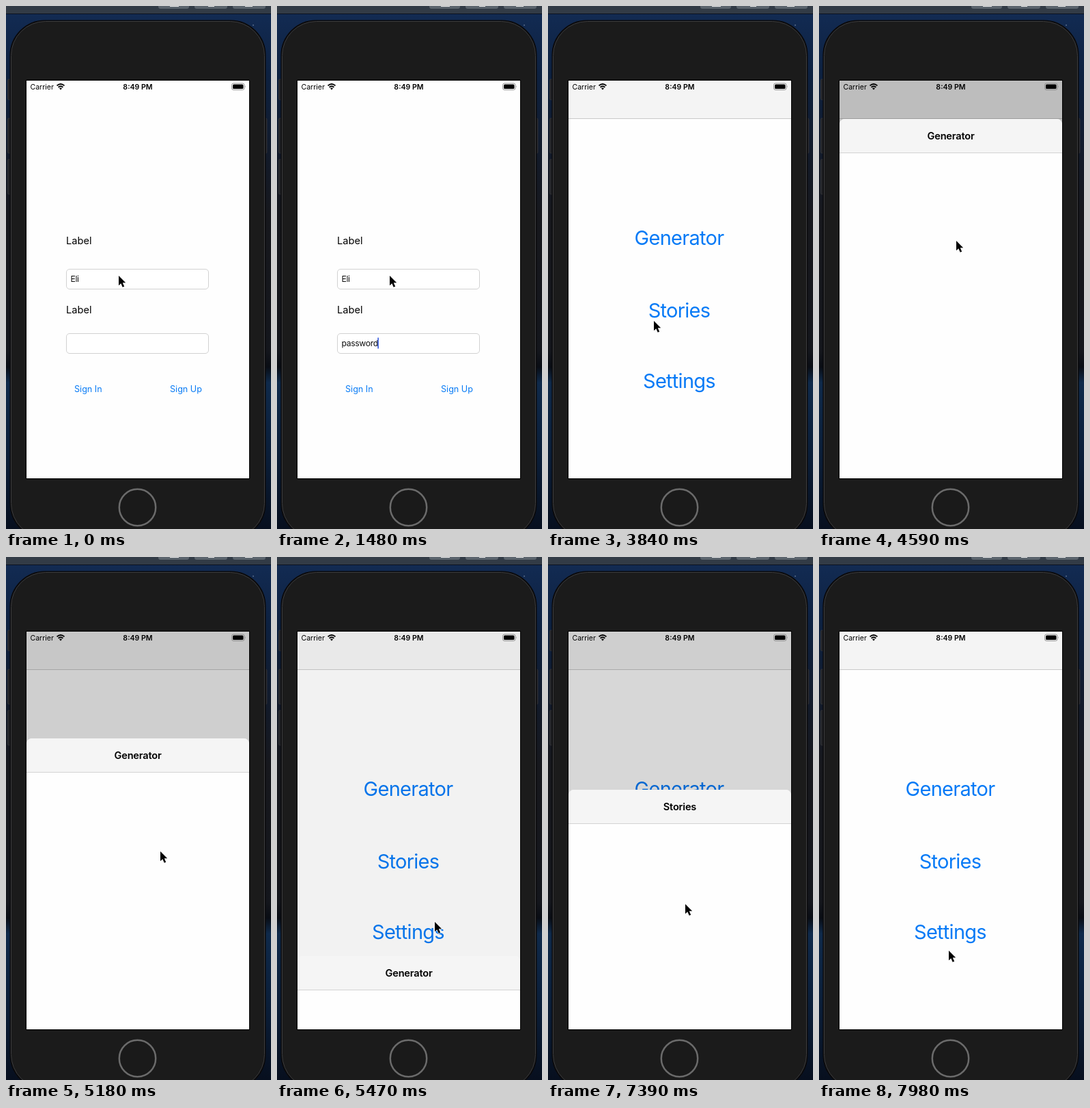
Recreate the animation shown at these times as an HTML page. Size 388x764 px, loop 8000 ms.

```html
<!DOCTYPE html>
<html lang="en">
<head>
<meta charset="utf-8">
<title>Sign in demo</title>
<style>
  html, body { margin: 0; width: 100%; height: 100%; overflow: hidden; background: #0b1a30; }
  svg { display: block; width: 388px; height: 764px; font-family: Inter, "Liberation Sans", sans-serif; }
  .label { font-size: 14.6px; }
  .field { fill: #fff; stroke: #d2d2d2; }
  .input { font-size: 12.2px; letter-spacing: -.03em; fill: #111; }
  .link { font-size: 12.6px; fill: #0a7cf5; }
  .item { font-size: 29px; letter-spacing: -.025em; fill: #067af6; text-anchor: middle; }
  .title { font-size: 14.6px; font-weight: 600; letter-spacing: -.2px; text-anchor: middle; }
</style>
</head>
<body>
<svg viewBox="0 0 388 764">
  <defs>
    <linearGradient id="desk" x2="0" y2="1">
      <stop offset="0" stop-color="#132c55"/>
      <stop offset=".13" stop-color="#0d2140"/>
      <stop offset=".3" stop-color="#131a28"/>
      <stop offset=".4" stop-color="#17181d"/>
      <stop offset=".66" stop-color="#14161c"/>
      <stop offset=".69" stop-color="#090d14"/>
      <stop offset=".72" stop-color="#0f2a4b"/>
      <stop offset=".88" stop-color="#0a1c35"/>
      <stop offset="1" stop-color="#070f1e"/>
    </linearGradient>
    <clipPath id="screen"><rect x="30" y="109" width="326" height="581"/></clipPath>
  </defs>

  <rect width="388" height="764" fill="url(#desk)"/>
  <rect width="388" height="11" fill="#323b46"/>
  <path d="M0 11.5H388" stroke="#0a1220"/>
  <g fill="#5b646d">
    <rect x="223" y="-6" width="45" height="10" rx="3"/>
    <rect x="276" y="-6" width="48" height="10" rx="3"/>
    <rect x="332" y="-6" width="48" height="10" rx="3"/>
  </g>
  <path d="M240 0H253M296 0H305M350 0H361" stroke="#eee" stroke-width="2"/>
  <circle cx="362" cy="28" r=".8" fill="#8a9bb5"/>

  <g fill="#25262a" stroke="#3a3b3f" stroke-width=".6">
    <rect x="2.500" y="107" width="6" height="30" rx="1.500"/>
    <rect x="2.500" y="164" width="6" height="51" rx="1.500"/>
    <rect x="2.500" y="224" width="6" height="51" rx="1.500"/>
    <rect x="377" y="164" width="5" height="51" rx="1.500"/>
  </g>
  <rect x="7" y="22" width="372" height="755" rx="50" fill="#1b1b1b" stroke="#0a0a0c" stroke-width="3"/>
  <rect x="7.500" y="22.500" width="371" height="754" rx="50" fill="#1b1b1b" stroke="#3d3d3f"/>
  <circle cx="192.500" cy="732.500" r="26.700" fill="#1a1a1a" stroke="#6b6b6b" stroke-width="2.500"/>
  <rect x="29" y="108" width="328" height="583" fill="#000"/>

  <g clip-path="url(#screen)">
    <rect x="30" y="109" width="326" height="581" fill="#fefefe"/>
    <text class="label" x="88" y="348">Label</text>
    <rect class="field" x="88.500" y="384.500" width="208" height="29" rx="4.500"/>
    <text class="input" x="94.500" y="403">Eli</text>
    <text class="label" x="88" y="449">Label</text>
    <rect class="field" x="88.500" y="478.500" width="208" height="29" rx="4.500"/>
    <text class="input" id="password" x="94.500" y="497"></text>
    <rect id="caret" y="484.500" width="1.700" height="16" fill="#3f63e0"/>
    <text class="link" id="signIn" x="100" y="563.500">Sign In</text>
    <text class="link" x="240" y="563.500">Sign Up</text>

    <g id="menu">
      <rect x="30" y="109" width="326" height="581" fill="#fefefe"/>
      <rect x="30" y="109" width="326" height="56" fill="#f4f4f4"/>
      <path d="M30 164.500H356" stroke="#cacaca"/>
      <text class="item" id="generator" x="192" y="349">Generator</text>
      <text class="item" id="stories" x="192" y="454.500">Stories</text>
      <text class="item" x="192" y="558.300">Settings</text>
    </g>
    <rect id="dim" x="30" y="109" width="326" height="581"/>

    <g id="sheet">
      <path d="M30 600V9Q30 0 39 0H347Q356 0 356 9V600Z" fill="#fefefe"/>
      <path d="M30 49V9Q30 0 39 0H347Q356 0 356 9V49Z" fill="#f5f5f5"/>
      <path d="M30 49.500H356" stroke="#d3d3d3"/>
      <text class="title" id="sheetTitle" x="193" y="30"></text>
    </g>

    <text x="35.500" y="122" font-size="10.500">Carrier</text>
    <text x="193" y="122" font-size="10.600" font-weight="600" text-anchor="middle">8:49 PM</text>
    <g fill="none" stroke="#000" stroke-width="1.900">
      <path d="M74.500 116.400Q80 111.500 85.500 116.400M76.600 118.800Q80 115.800 83.400 118.800"/>
      <path d="M78 120.200Q80 118.600 82 120.200L80 122.400Z" fill="#000" stroke="none"/>
    </g>
    <rect x="330.500" y="113" width="18.500" height="9.500" rx="2.600" fill="none" stroke="#888" stroke-width=".9"/>
    <rect x="332" y="114.500" width="15.500" height="6.500" rx="1.500"/>
    <path d="M350.300 116.200Q351.600 117.700 350.300 119.200Z" fill="#888"/>
  </g>

  <path id="cursor" d="M0 0V14.200L3.300 11.200L5.700 16.800L8.200 15.700L5.800 10.300H10.200Z"
    stroke="#fff" stroke-width="1.300" paint-order="stroke"/>
</svg>

<script>
const $ = id => document.getElementById(id);
const LOOP = 8000, BEAT = 147.6, FIRST = 446;
const TOP = 109, BOTTOM = 690, SHEET_TOP = 135;

// Remaining distance of a critically damped spring, from 1 to 0.
const spring = ms => {
  const x = Math.max(0, ms) * 0.01826;
  return (1 + x) * Math.exp(-x);
};

// Linear interpolation over rows of [beat, ...values].
function track(rows, beat) {
  const next = rows.findIndex(row => row[0] > beat);
  if (next < 0) return rows[rows.length - 1].slice(1);
  if (next === 0) return rows[0].slice(1);
  const a = rows[next - 1], b = rows[next];
  const u = (beat - a[0]) / (b[0] - a[0]);
  return a.slice(1).map((v, i) => v + (b[i + 1] - v) * u);
}

const pointer = [
  [8, 165, 394], [9, 150, 440], [10, 118, 540], [11, 104, 575], [12, 119, 555],
  [21, 119, 555], [23, 155, 460], [25, 201, 343], [29, 201, 343],
  [30, 210, 300], [31, 220, 330], [32, 226, 430], [33, 231, 533],
  [36, 231, 533], [39, 205, 442], [43, 205, 442], [44, 202, 302],
  [45, 201, 380], [46, 201, 478], [47, 201, 507], [48, 201, 567], [51, 190, 575]
];

const sheets = [
  { name: "Generator", open: 4328, drag: 30, grab: 300, drop: 5343, dropY: 368 },
  { name: "Stories", open: 6451, drag: 44, grab: 302, drop: 7545, dropY: 400 }
];

function sheetY(s, time, beat, pointerY) {
  if (time < s.open) return BOTTOM;
  if (time >= s.drop) return BOTTOM - (BOTTOM - s.dropY) * spring(time - s.drop);
  if (beat >= s.drag) return SHEET_TOP + Math.max(0, pointerY - s.grab);
  return SHEET_TOP + (BOTTOM - SHEET_TOP) * spring(time - s.open);
}

const typedCounts = [1, 2, 4, 5, 6, 7, 7];
const press = (beat, start, levels) => levels[beat - start] ?? 1;
const move = (el, x, y) => el.setAttribute("transform", `translate(${x} ${y})`);

function draw(ms) {
  const beat = Math.floor((ms - FIRST) / BEAT);
  const time = beat < 0 ? 0 : 450 + beat * BEAT;
  const [px, py] = track(pointer, beat);
  move($("cursor"), px, py);

  const count = beat < 0 ? 0 : typedCounts[beat] ?? 8;
  $("password").textContent = "password".slice(0, count);
  $("caret").setAttribute("x", 94 + (count ? $("password").getComputedTextLength() : 0));
  $("caret").style.opacity = beat >= 0 && beat < 18 ? 1 : 0;
  $("signIn").style.opacity = press(beat, 14, [.25, .7, .9]);
  $("generator").style.opacity = press(beat, 26, [.25, .35, .8]);
  $("stories").style.opacity = press(beat, 40, [.25, .32, .8]);

  const rise = (BOTTOM - TOP) * spring(time - 3213);
  move($("menu"), 0, rise < .5 ? 0 : Math.round(rise));

  const sheet = sheets[time < sheets[1].open ? 0 : 1];
  const y = Math.round(sheetY(sheet, time, beat, py));
  $("sheetTitle").textContent = sheet.name;
  move($("sheet"), 0, y);
  $("dim").style.opacity = .24 * (BOTTOM - y) / (BOTTOM - SHEET_TOP);
}

const start = performance.now();
function tick() {
  draw((performance.now() - start) % LOOP);
  requestAnimationFrame(tick);
}
tick();
</script>
</body>
</html>
```
